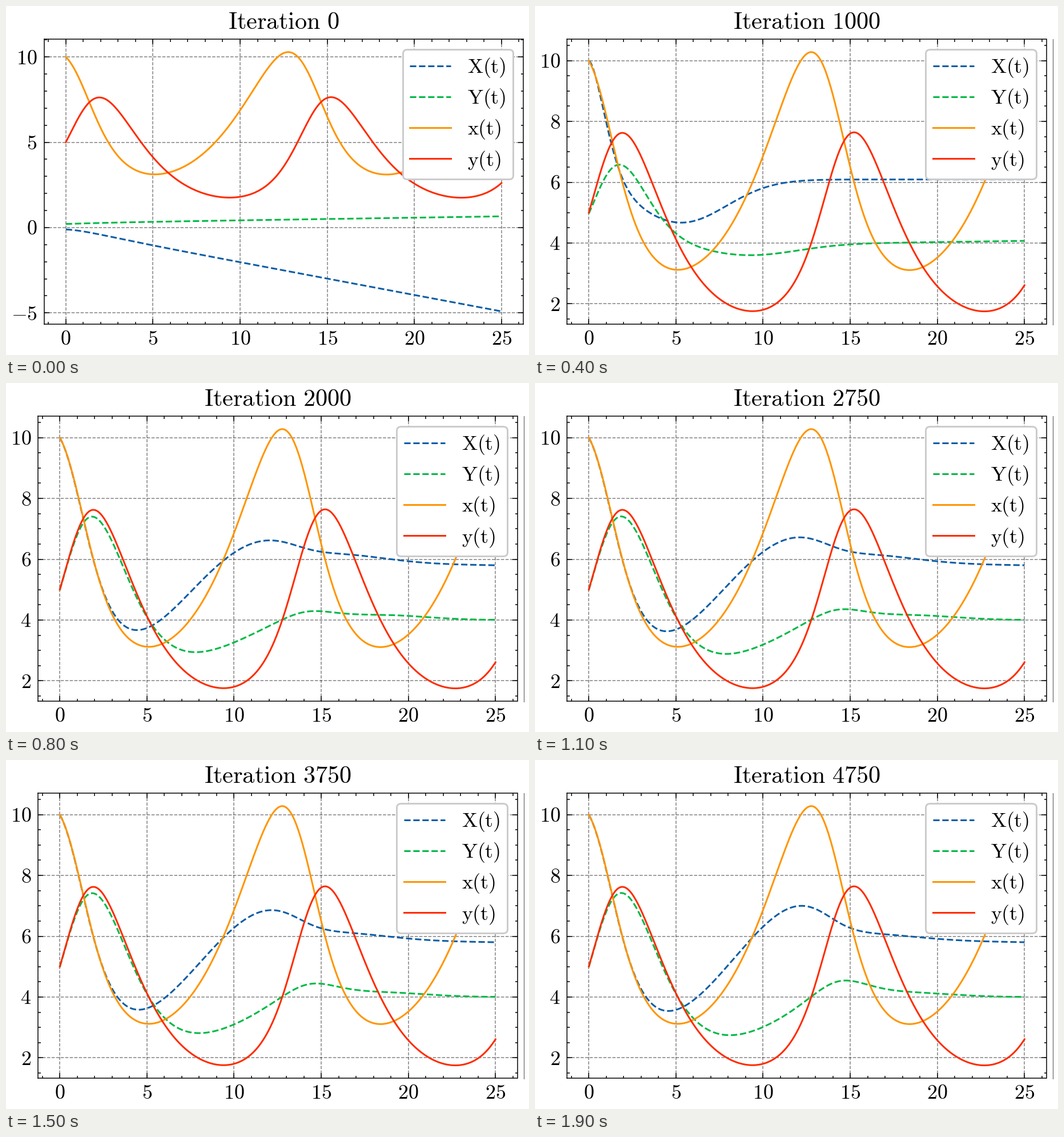
Write a matplotlib script that moves like this. It is 916 by 611 pixels and loops after 2 s.

```python
import numpy as np
import matplotlib.pyplot as plt
from matplotlib.animation import FuncAnimation
from matplotlib.lines import Line2D
from matplotlib.ticker import AutoMinorLocator, MultipleLocator

W, H, DPI = 916, 611, 128
S = 216 / DPI  # one style point is three pixels
FRAMES, STEP = 20, 250

plt.rcParams.update({
    "font.family": "Liberation Serif", "mathtext.fontset": "cm",
    "font.size": 12 * S, "axes.titlesize": 14.1 * S, "legend.fontsize": 12 * S,
    "axes.linewidth": 0.5 * S, "lines.linewidth": S, "patch.linewidth": S,
    "axes.axisbelow": True, "axes.titlepad": 6 * S,
    "axes.grid": True, "grid.color": "k", "grid.alpha": 0.5,
    "grid.linestyle": "--", "grid.linewidth": 0.5 * S,
    "legend.framealpha": 1, "legend.edgecolor": "0.8",
    "legend.borderpad": 0.344, "legend.labelspacing": 0.39,
    "xtick.top": True, "ytick.right": True,
})
for side, pad in (("xtick", 3.7), ("ytick", 4.0)):
    plt.rcParams.update({
        f"{side}.direction": "in", f"{side}.minor.visible": True,
        f"{side}.major.size": 3 * S, f"{side}.minor.size": 1.5 * S,
        f"{side}.major.width": 0.5 * S, f"{side}.minor.width": 0.5 * S,
        f"{side}.major.pad": pad * S,
    })

BLUE, GREEN, ORANGE, RED = "#0C5DA5", "#00B945", "#FF9500", "#FF2C00"


def lotka_volterra(end=25, steps=10000, keep=25):
    """Explicit Euler solution, thinned to every keep-th step."""
    dt = end / steps
    x, y = 10.0, 5.0
    path = [(x, y)]
    for _ in range(steps):
        x, y = x + dt * x * (0.4 - 0.1 * y), y + dt * y * (0.1 * x - 0.6)
        path.append((x, y))
    return np.linspace(0, end, steps // keep + 1), *np.array(path[::keep]).T


t, prey, predator = lotka_volterra()


def fade(tau, power):
    return np.exp(-(t / tau) ** power)


def bump(center, width):
    return np.exp(-((t - center) / width) ** 2)


def hump(peak, shift, width):
    """Skewed bump with a long right tail."""
    return np.exp(-(np.log((t + shift) / (peak + shift)) / width) ** 2)


# Each training stage returns the predicted (prey, predator) curves.
def untrained():
    return (-0.11 - 0.192 * t + 0.15 * t * np.exp(-t / 1.5),
            0.27 + 0.0155 * t - 0.06 * np.exp(-t / 3))


def early():
    return (4.6 + 0.045 * t + 0.002 * t**2 + 5.4 * fade(2.06, 1.2),
            3.87 + 2.06 * hump(1.9, 3, 0.643))


def middle():
    return (6.09 + 4.09 * fade(1.35, 1.7) - 1.42 * bump(5.3, 3.7),
            3.87 + 0.008 * t + 2.7 * hump(1.75, 6, 0.27) - 0.35 * bump(9.3, 3.8))


def late(progress=0):
    """True orbit decaying to equilibrium, followed longer with training."""
    tau = 9 + 1.3 * progress
    return (6 - 0.008 * t + (prey - 6) * fade(tau, 2.3) + 0.35 * bump(15.5, 4),
            4 + (predator - 4) * fade(1.07 * tau, 2.3)
            - 0.14 * bump(2, 1.3) + 0.17 * bump(18.5, 3.5))


STAGES = [(0, untrained), (500, early), (1000, middle), (2000, late)]


def predict(iteration):
    if iteration >= 2000:
        return late((iteration - 2000) / 2750)
    for (i0, before), (i1, after) in zip(STAGES, STAGES[1:]):
        if iteration < i1:
            u = (iteration - i0) / (i1 - i0)
            if before is untrained:  # the first steps learn fastest
                u = 1 - (1 - u) ** 3
            return [(1 - u) * a + u * b for a, b in zip(before(), after())]


def roman(text):
    return r"$\mathrm{%s}$" % text.replace(" ", r"\ ")


fig = plt.figure(figsize=(W / DPI, H / DPI), dpi=DPI, facecolor="white")
ax = fig.add_axes([0, 0, 1, 1])
edge = Line2D([906.5 / W] * 2, [1 - 557.5 / H, 1 - 57.5 / H], color="0.3",
              lw=72 / DPI, transform=fig.transFigure)
fig.add_artist(edge)


def draw(n):
    iteration = n * STEP
    left = 66.6 if n == 0 else 56.1
    edge.set_visible(n > 0)
    ax.clear()
    ax.set_position([left / W, 1 - 557.3 / H, 839.4 / W, 499.3 / H])

    guess_x, guess_y = predict(iteration)
    ax.plot(t, guess_x, "--", color=BLUE, label=roman("X(t)"))
    ax.plot(t, guess_y, "--", color=GREEN, label=roman("Y(t)"))
    ax.plot(t, prey, color=ORANGE, label=roman("x(t)"))
    ax.plot(t, predator, color=RED, label=roman("y(t)"))

    for axis, step in ((ax.xaxis, 5), (ax.yaxis, 5 if n == 0 else 2)):
        axis.set_major_locator(MultipleLocator(step))
        axis.set_minor_locator(AutoMinorLocator())
        axis.set_major_formatter(lambda v, pos: f"${v:.0f}$")
    ax.set_title(roman(f"Iteration {iteration}"), y=1)
    ax.legend(loc="upper center" if iteration in (500, 750) else "upper right")
    return []


anim = FuncAnimation(fig, draw, frames=FRAMES, interval=100,
                     init_func=lambda: draw(0), repeat=True, repeat_delay=0)
plt.show()
```
